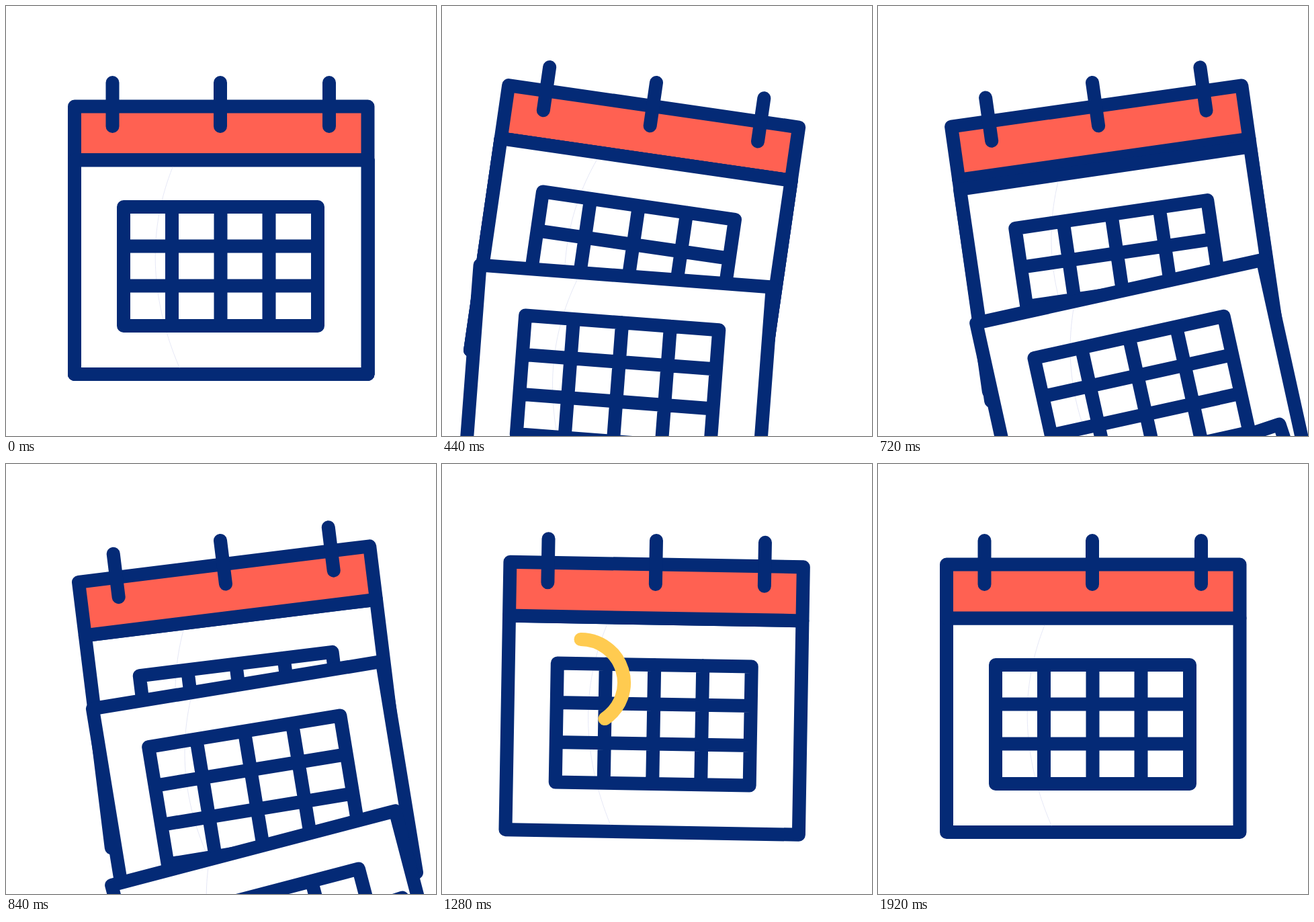
An HTML page that plays this animation: 640 by 640 pixels, repeating every 2000 ms.

```html
<!DOCTYPE html>
<html lang="en">
<head>
<meta charset="utf-8">
<title>Calendar</title>
<style>
  html, body { margin: 0; height: 100%; overflow: hidden; background: #fff; }
  svg { display: block; width: 100vw; height: 100vh; }
</style>
</head>
<body>
<svg viewBox="0 0 640 640" fill="none" stroke="#042a76" stroke-width="20" stroke-linecap="round" stroke-linejoin="round">
  <defs>
    <g id="page">
      <path d="M102 229.5H538.5V548H102Z" fill="#fff"/>
      <path d="M248 240C212 330 212 430 258 538" stroke="#dcdff2" stroke-width=".7"/>
      <path d="M175 299H464V476H175ZM247 299V476M319.5 299V476M391.5 299V476M175 357.5H464M175 416.5H464"/>
    </g>
  </defs>
  <g id="calendar">
    <use href="#page"/>
    <path d="M102 149.5H538.5V229.5H102Z" fill="#ff6152"/>
    <path d="M158.5 114V179M319 114V179M481 114V179"/>
    <use class="sheet" href="#page"/>
    <use class="sheet" href="#page"/>
    <use class="sheet" href="#page"/>
  </g>
  <path id="ring" stroke="#ffcb50"/>
</svg>
<script>
const LOOP = 2000, STEP = 40;
const calendar = document.getElementById('calendar');
const ring = document.getElementById('ring');
const sheets = document.querySelectorAll('.sheet');

// [time, degrees]
const swing = [[70, 0], [360, 10], [760, -8.5], [1120, 4], [1360, 0]];
// The first sheet to fall is the topmost, so latest start comes first
const starts = [656, 451, 189];
const FALL_TIME = 610, FALL = 485, TILT = -0.0222;

function ease(t, from, to) {
  const x = Math.min(1, Math.max(0, (t - from) / (to - from)));
  return (1 - Math.cos(Math.PI * x)) / 2;
}

function swingAt(t) {
  let angle = 0;
  for (let i = 1; i < swing.length; i++) {
    const [t0, a0] = swing[i - 1], [t1, a1] = swing[i];
    angle += (a1 - a0) * ease(t, t0, t1);
  }
  return angle;
}

function ringPoint(deg) {
  const a = (deg - 90) * Math.PI / 180;
  return `${206.5 + 64.5 * Math.cos(a)} ${325.5 + 64.5 * Math.sin(a)}`;
}

function ringPath(t) {
  const head = 540 * ease(t, 1041, 1727);
  const tail = 540 * ease(t, 1320, 1920);
  const span = head - tail;
  if (span < 0.1) return '';
  // Two halves keep each arc under a full turn
  const arc = deg => `A64.5 64.5 0 ${span > 360 ? 1 : 0} 1 ${ringPoint(deg)}`;
  return `M${ringPoint(tail)}${arc(tail + span / 2)}${arc(head)}`;
}

function draw(now) {
  let t = Math.floor((now % LOOP + 2) / STEP) * STEP % LOOP;
  if (t < 120) t = 0;
  calendar.setAttribute('transform', `rotate(${swingAt(t)} 319 114)`);
  sheets.forEach((sheet, i) => {
    const drop = FALL * ease(t, starts[i], starts[i] + FALL_TIME);
    sheet.setAttribute('transform', `translate(0 ${drop}) rotate(${TILT * drop} 320 293)`);
  });
  ring.setAttribute('d', ringPath(t));
}

const begin = performance.now();
function tick() {
  draw(performance.now() - begin);
  requestAnimationFrame(tick);
}
tick();
</script>
</body>
</html>
```
